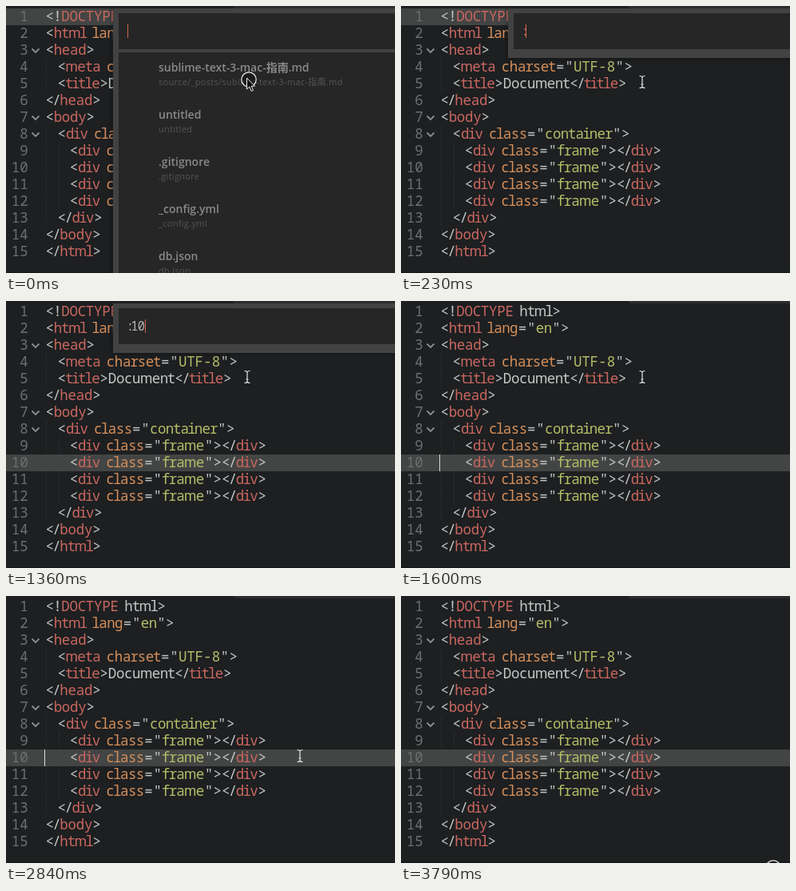
Animation of 487 by 334 pixels, one loop 3.89 s. Source, as an HTML page:

```html
<!DOCTYPE html>
<html lang="en">
<head>
<meta charset="UTF-8">
<title>Go to line</title>
<style>
  html, body { margin: 0; width: 100%; height: 100%; overflow: hidden; background: #1d1f21; }
  svg { display: block; width: 487px; height: 334px; }
  text { white-space: pre; }
  .code { font: 17.5px "Noto Sans Mono", monospace; text-anchor: middle; fill: #c5c8c6; }
  .code .wide { font-family: Roboto, sans-serif; }
  .tag { fill: #c9675f; }
  .attr { fill: #d58f5a; }
  .str { fill: #b5bd68; }
  .num { fill: #6d6f71; }
  .query { font-size: 15.5px; fill: #b4b4b4; }
  .name { font: 600 14px "Open Sans", "Noto Sans CJK SC", sans-serif; fill: #898989; }
  .path { font: 11px "Open Sans", "Noto Sans CJK SC", sans-serif; letter-spacing: .3px; fill: #555; }
  .fold { fill: none; stroke: #8b8d8e; stroke-width: 1.8; }
  .guide { stroke: #3b3d3f; stroke-dasharray: 1 2; }
  .popup { filter: drop-shadow(0 0 3px rgba(0, 0, 0, .45)); }
</style>
</head>
<body>
<svg viewBox="0 0 487 334">
  <rect width="487" height="334" fill="#1d1f21"/>
  <rect y="333" width="487" height="1" fill="#151618"/>
  <rect id="row" width="487" height="21" fill="#434544"/>
  <g id="editor"></g>
  <rect id="caret" x="48" y="192" width="1" height="21" fill="#d8dad8"/>
  <g id="popup">
    <rect id="frame" class="popup" x="134" y="-8" width="361" fill="#424242"/>
    <rect x="141" y="9" width="346" height="45" fill="#262626"/>
    <g id="list"><rect x="141" y="58" width="346" height="276" fill="#262626"/></g>
    <g id="query"></g>
    <rect id="queryCaret" y="23" width="1" height="17" fill="#d4644a"/>
  </g>
  <rect width="487" height="3" fill="#1d1f21"/>
  <path d="M284 0H487V3H287Z" fill="#2b2d2e"/>
  <circle id="ring" r="9.2" fill="#111" fill-opacity=".55" stroke="#eee" stroke-width="1.2"/>
  <path id="arrow" transform="translate(301.5 90)" d="M0 0V14L3.3 11L5.6 16.5L8 15.4L5.7 10.2H10Z"
        fill="#111" stroke="#eee"/>
  <path id="beam" d="M-3.5-7.5Q0-7.5 0-5.5Q0-7.5 3.5-7.5M0-5.5V5.5M-3.5 7.5Q0 7.5 0 5.5Q0 7.5 3.5 7.5M-1.5 3H1.5"
        fill="none" stroke="#e6e6e6" stroke-width="1.2"/>
</svg>
<script>
const LOOP = 3890, PITCH = 21, TOP = 3;
const $ = id => document.getElementById(id);
const rowTop = n => TOP + PITCH * (n - 1);

// Advance widths of the quasi-proportional code face
const advances = [
  [' /', 7.6], ['i', 7.3], ['l', 7.8], ['t', 8.7], ['r', 8.6], ['f', 9.2], ['!n', 9.6],
  ['cs', 9.8], ['<>d', 10.3], ['=-', 11], ['"', 11.5], ['m', 14.5]
];
const advance = ch => (advances.find(([set]) => set.includes(ch)) || [, 10.2])[1];
const escapeChar = ch => ({ '<': '&lt;', '>': '&gt;', '&': '&amp;' }[ch] || ch);

const add = (id, markup) => $(id).insertAdjacentHTML('beforeend', markup);

const source = `<!DOCTYPE html>
<html lang="en">
<head>
  <meta charset="UTF-8">
  <title>Document</title>
</head>
<body>
  <div class="container">
${'    <div class="frame"></div>\n'.repeat(4)}  </div>
</body>
</html>`.split('\n');

function tokenClass(before) {
  if (/[<\/!]$/.test(before)) return 'tag';
  return before.endsWith('"') ? 'str' : 'attr';
}

function codeLine(line, y) {
  const parts = line.split(/((?<=<[\/!]?)\w+|\w+(?==)|(?<==")[^"]+)/);
  let x = 49.5, spans = '';
  parts.forEach((part, i) => {
    const kind = i % 2 ? tokenClass(parts[i - 1]) : '';
    for (const ch of part) {
      const w = advance(ch);
      if (ch !== ' ') {
        spans += `<tspan x="${x + w / 2}" class="${kind}${ch === 'm' ? ' wide' : ''}">${escapeChar(ch)}</tspan>`;
      }
      x += w;
    }
  });
  return `<text class="code" y="${y}">${spans}</text>`;
}

const guide = (x, first, last) =>
  `<path class="guide" d="M${x} ${rowTop(first)}V${rowTop(last + 1)}"/>`;

add('editor', guide(50.5, 4, 5) + guide(50.5, 8, 13) + guide(66.5, 9, 12));
source.forEach((line, i) => {
  const n = i + 1, y = rowTop(n) + 16;
  const xs = n > 9 ? '12 22.5' : '22.5';
  add('editor', `<text class="code num" x="${xs}" y="${y}">${n}</text>` + codeLine(line, y));
});
[3, 7, 8].forEach(n =>
  add('editor', `<path class="fold" d="M32.5 ${rowTop(n) + 8.5}l4.5 4.5l4.5-4.5"/>`));

const files = [
  ['sublime-text-3-mac-指南.md', 'source/_posts/'],
  ['untitled', ''], ['.gitignore', ''], ['_config.yml', ''], ['db.json', '']
];
files.forEach(([name, folder], i) => {
  const y = 82 + 59 * i;
  add('list', `<text class="name" x="191" y="${y}">${name}</text>
    <text class="path" x="191" y="${y + 17}">${folder + name}</text>`);
});
add('query', '<text class="code query" x="155.5 161 169.5" y="37"></text>');
const queryText = $('query').firstElementChild;

// Each table holds [start time, value]; the last started entry applies
const tables = {
  row: [[0, 1], [1360, 10]],
  query: [[0, ''], [230, ':'], [1240, ':1'], [1360, ':10']],
  queryCaret: [[0, 1], [50, .5], [230, 1], [650, .5], [710, 0], [1240, 1]],
  caret: [[0, 0], [1600, 1], [1960, .67], [2050, .33], [2140, 0],
    [2550, .33], [2640, .67], [2730, 1], [3530, .67], [3585, .33], [3640, 0]]
};
const at = (name, t) => tables[name].filter(([start]) => start <= t).pop()[1];
const caretX = [152, 156, 165, 174];
const show = (id, on) => $(id).style.display = on ? '' : 'none';
const mix = (a, b, u) => a + (b - a) * u;

function beamPosition(t) {
  const k = Math.max(0, Math.min(9, Math.floor((t - 2480) / 60)));
  if (k <= 6) {
    const u = (k / 6) ** 1.3;
    return [mix(302, 368, u), mix(95, 200, u)];
  }
  const u = 1 - (1 - (k - 6) / 3) ** 1.5;
  return [mix(368, 410.5, u), mix(200, 315, u)];
}

function render(t) {
  const listed = t < 230, query = at('query', t);
  $('row').setAttribute('y', rowTop(at('row', t)));
  $('caret').setAttribute('opacity', at('caret', t));

  show('popup', t < 1600);
  show('list', listed);
  $('frame').setAttribute('height', listed ? 350 : 73);
  if (queryText.textContent !== query) queryText.textContent = query;
  queryText.style.fill = query === ':' ? '#d4755c' : '';
  $('queryCaret').setAttribute('x', caretX[query.length]);
  $('queryCaret').setAttribute('opacity', at('queryCaret', t));

  const leaving = t >= 3790;
  show('ring', t < 50 || leaving);
  $('ring').setAttribute('transform', leaving ? 'translate(466 340)' : 'translate(304 92)');
  show('arrow', listed);
  show('beam', !listed && !leaving);
  $('beam').setAttribute('transform', `translate(${beamPosition(t)})`);
}

const begin = performance.now();
function tick() {
  render((performance.now() - begin) % LOOP);
  requestAnimationFrame(tick);
}
tick();
</script>
</body>
</html>
```
